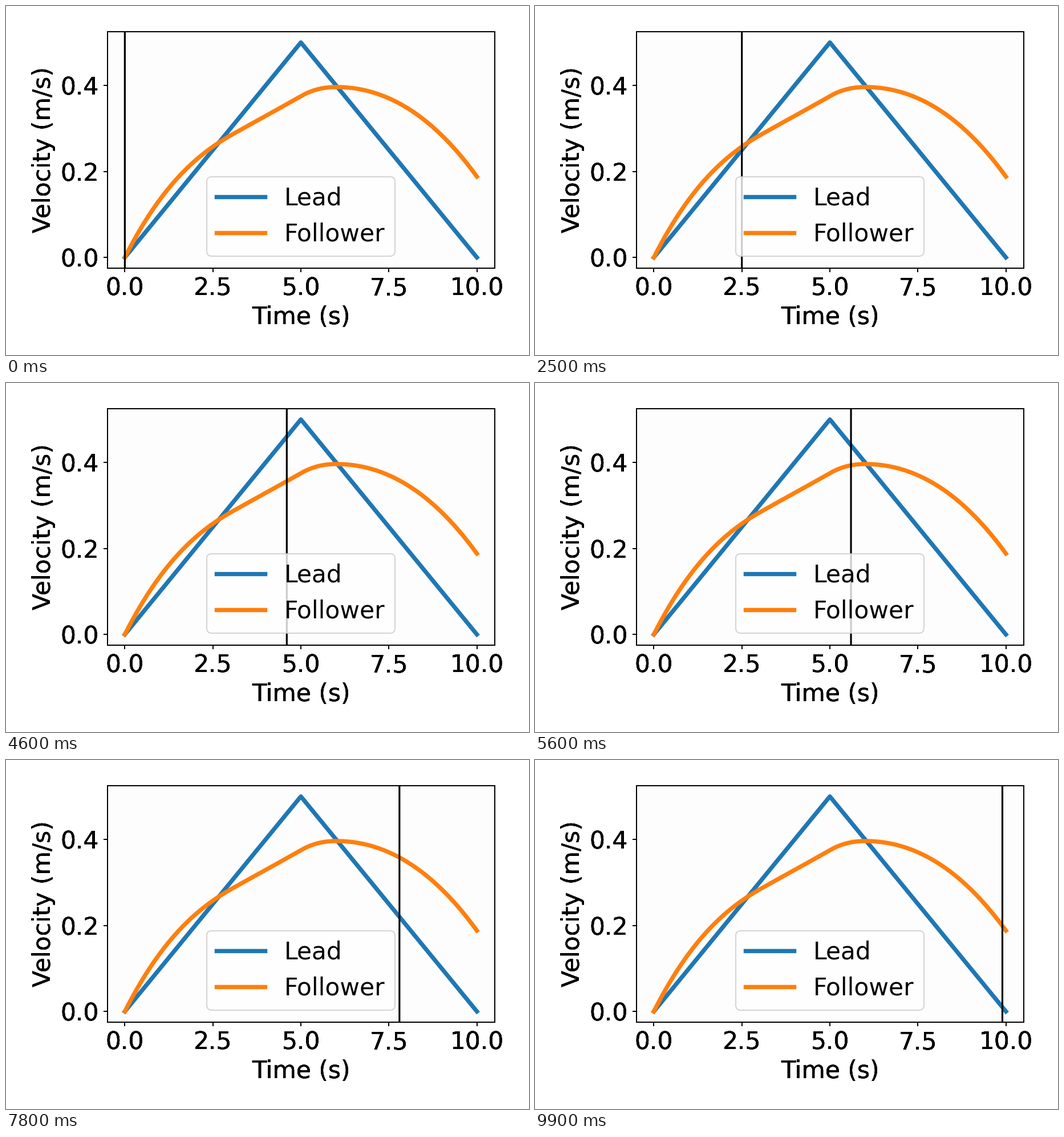
Animation, 917 px wide and 611 px high, one loop 10000 ms. Source, as a matplotlib script:

```python
import numpy as np
import matplotlib.pyplot as plt
from matplotlib.animation import FuncAnimation

W, H, DPI = 917, 611, 152.8
FRAMES, INTERVAL = 100, 100
LEFT, TOP, WIDTH, HEIGHT = 177.5, 45, 679, 414
TEXT_LAYERS = 5  # repeated passes give the crisp, heavy label edges

plt.rcParams.update({"font.family": "DejaVu Sans", "font.size": 20})


def lead(t):
    return 0.5 - 0.1 * np.abs(t - 5)


def follower(t):
    """Smooth cubic path through a few key velocities and accelerations."""
    time = np.array([0, 3, 5, 6, 10])
    vel = np.array([0, 0.2835, 0.375, 0.3963, 0.188])
    acc = np.array([0.162, 0.0465, 0.047, 0, -0.113])
    i = np.clip(np.searchsorted(time, t, side="right") - 1, 0, len(time) - 2)
    h = time[i + 1] - time[i]
    s = (t - time[i]) / h
    ease = s * s * (3 - 2 * s)
    bend = s * (1 - s) * h * ((1 - s) * acc[i] - s * acc[i + 1])
    return vel[i] + (vel[i + 1] - vel[i]) * ease + bend


def labelled_axes(fig, **kw):
    box = (LEFT / W, 1 - (TOP + HEIGHT) / H, WIDTH / W, HEIGHT / H)
    ax = fig.add_axes(box, xlim=(-0.5, 10.5), ylim=(-0.025, 0.525),
                      xlabel="Time (s)", ylabel="Velocity (m/s)", **kw)
    ax.set_xticks(np.arange(0, 10.1, 2.5))
    ax.set_yticks(np.arange(0, 0.5, 0.2))
    for axis in (ax.xaxis, ax.yaxis):
        axis.set_major_formatter("{x:.1f}")
    return ax


# The small surplus guards against rounding down a pixel
fig = plt.figure(figsize=((W + 0.01) / DPI, (H + 0.01) / DPI), dpi=DPI,
                 facecolor="white")
ax = labelled_axes(fig, label="main", facecolor="#fdfdfd")
for n in range(1, TEXT_LAYERS):
    labelled_axes(fig, label=f"layer{n}", facecolor="none")

t = np.linspace(0, 10, 1001)
for name, curve in (("Lead", lead), ("Follower", follower)):
    ax.plot(t, curve(t), lw=3.5, label=name)
cursor = ax.axvline(0, color="black", lw=1.5, snap=False)
ax.legend(loc="lower center", facecolor="white")


def update(k):
    now = k * INTERVAL / 1000
    cursor.set_xdata([now, now])
    return cursor,


anim = FuncAnimation(fig, update, frames=FRAMES, interval=INTERVAL,
                     repeat=True, repeat_delay=0, blit=False)
plt.show()
```
